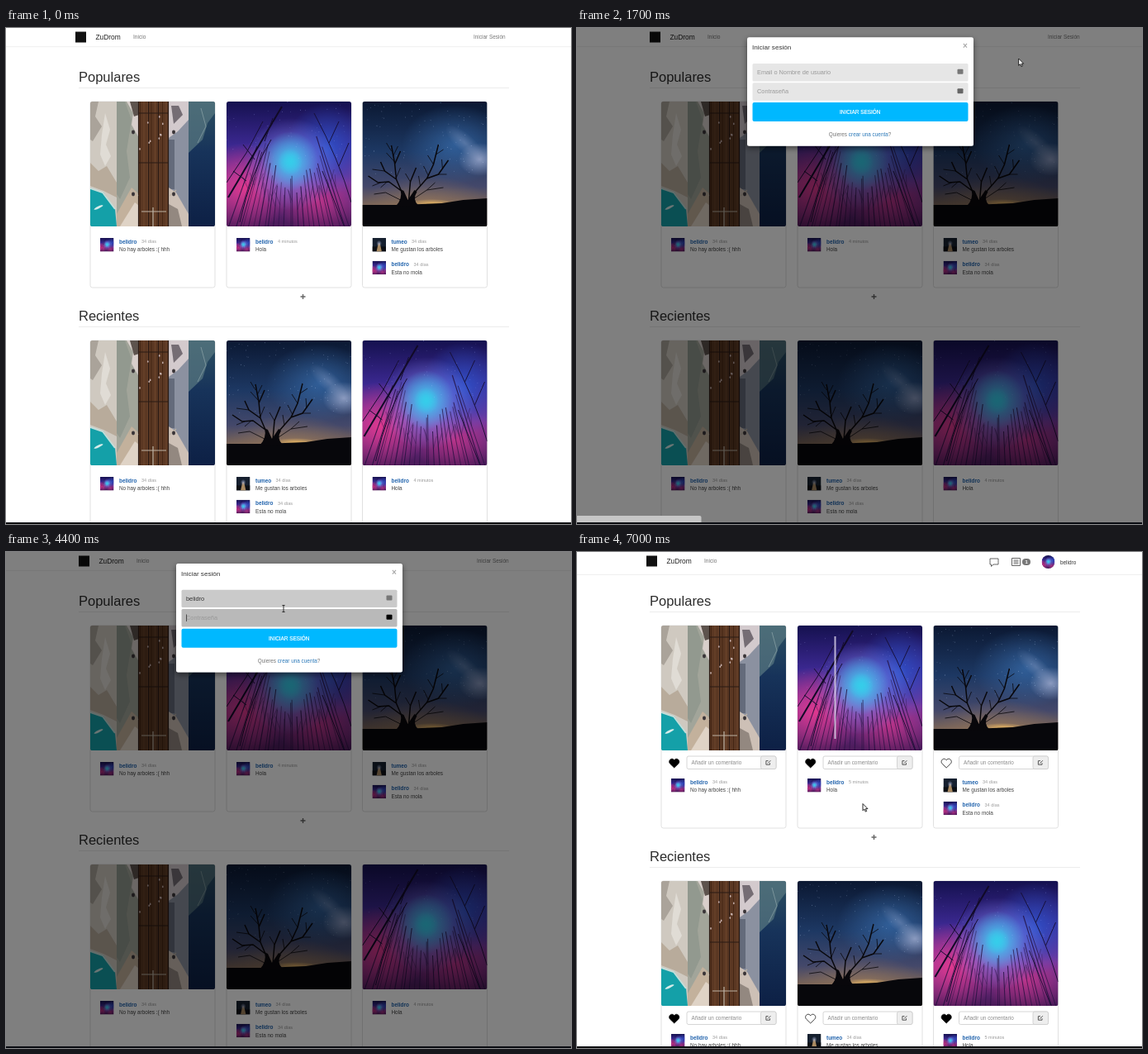
These frames come from a looping animation (684 by 600 pixels, 7.1 s). An HTML page:

```html
<!DOCTYPE html>
<html lang="es">
<head>
<meta charset="utf-8">
<title>ZuDrom</title>
<style>
  html, body { margin: 0; width: 100%; height: 100%; overflow: hidden; background: #fff; }
  svg { display: block; }
  text { font-family: "Liberation Sans", Arial, sans-serif; white-space: pre; }
</style>
</head>
<body>
<svg id="stage" width="684" height="600" viewBox="0 0 684 600"></svg>
<script>
const LOOP = 7100, STEP = 100;
const USER = 'belidro', FRIEND = 'tumeo';
const $ = id => document.getElementById(id);
const clamp = v => Math.max(0, Math.min(1, v));

// Markup helpers
const rect = (x, y, w, h, fill, more = '') =>
  `<rect x="${x}" y="${y}" width="${w}" height="${h}" fill="${fill}" ${more}/>`;
const path = (d, fill, more = '') => `<path d="${d}" fill="${fill}" ${more}/>`;
const line = (d, color, w, more = '') =>
  path(d, 'none', `stroke="${color}" stroke-width="${w}" ${more}`);
const oval = (x, y, rx, ry, fill, more = '') =>
  `<ellipse cx="${x}" cy="${y}" rx="${rx}" ry="${ry}" fill="${fill}" ${more}/>`;
const label = (x, y, size, fill, str, more = '') =>
  `<text x="${x}" y="${y}" font-size="${size}" fill="${fill}" ${more}>${str}</text>`;
const use = (id, x, y, size) =>
  `<use href="#${id}" x="${x}" y="${y}" width="${size}" height="${size}"/>`;
const stops = list => list.map(([o, c, a = 1]) =>
  `<stop offset="${o}" stop-color="${c}" stop-opacity="${a}"/>`).join('');
const linear = (id, list) =>
  `<linearGradient id="${id}" x2="0" y2="1">${stops(list)}</linearGradient>`;
const radial = (id, color, a = 1) =>
  `<radialGradient id="${id}">${stops([[0, color, a], [1, color, 0]])}</radialGradient>`;
const photo = (id, body) =>
  `<symbol id="${id}" viewBox="0 0 151 151"><g clip-path="url(#round)">${body}</g></symbol>`;

let seed = 7;
const rnd = () => (seed = seed * 16807 % 2147483647) / 2147483647;
const many = (n, fn) => Array.from({ length: n }, (_, i) => fn(i)).join('');
const stars = (n, h, color) => many(n, () =>
  oval((rnd() * 151).toFixed(1), (rnd() * h).toFixed(1), .45, .45, color, `opacity="${(.2 + rnd() * .5).toFixed(2)}"`));

function pier() {
  return rect(0, 0, 151, 151, '#cfc9c0') +
    path('M0 0H10L6 18 14 30 3 48 0 46Z', '#aaa39a') +
    path('M18 14L24 34 19 52 25 66 18 78 12 64 14 40Z', '#e0dcd5') +
    path('M0 74L10 84 20 78 32 98V116L16 108 0 102Z', '#b8ab9b') +
    path('M0 105L16 110 30 130 32 151H0Z', '#14a0a8') +
    line('M0 105L15 110 30 130', '#c3deda', 2) +
    oval(10, 128, 6, 1.3, '#d6ecea', 'transform="rotate(-25 10 128)"') +
    rect(32, 0, 27, 151, '#a2a59a') +
    path('M32 0H42L50 22 44 60 48 92 36 118 32 112Z', '#92998f') +
    path('M44 0H59V44L50 28 52 14Z', '#d8cfcb') +
    path('M48 0H59V16L53 18Z', '#5d534d') +
    path('M32 136L50 104 59 112V151H32Z', '#c3b19c') +
    path('M36 151L54 122 59 126V151Z', '#dfd3c6') +
    rect(95, 0, 24, 151, '#8b91a0') +
    path('M95 0H119V22L106 36 95 44Z', '#d3cacd') +
    path('M98 5H107L112 16 101 27Z', '#756d74') +
    rect(95, 46, 7, 60, '#646b7b') +
    path('M95 104L104 110 119 136V151H95Z', '#cdc0b6') +
    path('M95 124L106 130 111 151H95Z', '#938880') +
    rect(119, 0, 32, 151, 'url(#sea)') +
    path('M119 0H151V14L142 26 136 46 119 62Z', '#5b7a82', 'opacity=".7"') +
    line('M134 8L140 30 130 50', '#a9bdbd', 1, 'opacity=".5"') +
    rect(58, 0, 37, 151, '#5b3823') +
    many(8, i => rect(60 + i * 4.5, 0, 1, 151, i % 3 ? '#6d452c' : '#442615')) +
    line('M58.5 0V151M70.5 0V151M82.5 0V151M94.5 0V151M58 14H95M58 74H95', '#2a1a14', 1.2) +
    line('M62 133H92M76 128V151M50 107L58 114M96 114L104 107', '#bdb2a4', 1.2) +
    many(9, () => oval((60 + rnd() * 34).toFixed(1), (16 + rnd() * 45).toFixed(1), .8, 1.3, '#c9b3b0')) +
    many(4, i => oval(i % 2 ? 101 : 52, i < 2 ? 37 : 112, 2, 2.4, '#3a3538'));
}

function forest() {
  // Trunks lean to the middle; the outer ones reach higher
  const trunk = i => {
    const x = 2 + i * 6 + rnd() * 4, top = 92 - Math.abs(x - 77) * .8 + rnd() * 28;
    const tx = x + (77 - x) * (151 - top) / 210;
    return line(`M${x.toFixed(1)} 152L${tx.toFixed(1)} ${top.toFixed(1)}`,
      '#24103f', (.5 + rnd() * .7).toFixed(2), 'opacity=".8"') +
      line(`M${((x + tx) / 2).toFixed(1)} ${((152 + top) / 2).toFixed(1)}l${(rnd() * 14 - 7).toFixed(1)} -15`, '#2c1548', .4);
  };
  return rect(0, 0, 151, 151, 'url(#dusk)') +
    oval(22, 104, 58, 54, 'url(#pink)') + oval(112, 120, 52, 40, 'url(#pink)', 'opacity=".7"') +
    oval(122, 58, 52, 56, 'url(#blue)') + oval(78, 76, 58, 56, 'url(#lilac)') +
    oval(77, 72, 34, 36, 'url(#cyan)') + oval(77, 73, 15, 16, 'url(#cyan)') +
    stars(60, 75, '#a9b4ff') + many(25, trunk) +
    line('M2 116Q28 72 67 6', '#110a26', 2) +
    line('M0 98L24 62 44 24M16 146Q30 84 54 46M34 70L20 52M46 48L56 20M24 96L8 84', '#160d30', 1) +
    line('M151 122Q136 70 106 14M136 78L148 50M124 50L136 24M142 150L116 84', '#160d30', .9);
}

function tree() {
  return rect(0, 0, 151, 151, 'url(#night)') +
    oval(112, 52, 64, 48, 'url(#sky)') + oval(142, 70, 26, 20, 'url(#milk)') +
    oval(124, 50, 30, 11, 'url(#milk)', 'transform="rotate(42 124 50)" opacity=".45"') +
    oval(78, 126, 78, 36, 'url(#glow)') + oval(84, 123, 30, 5, 'url(#warm)') +
    stars(90, 95, '#bcd2f4') +
    path('M0 125L46 125 96 123 122 119 151 117V151H0Z', '#07070b') +
    path('M40 127Q49 118 46 106L50 108 55 119 63 107 66 109Q60 119 68 126Z', '#08070b') +
    line('M47 108L41 94 39 74 35 53M47 108L32 97 19 98 7 90M41 94L27 84 22 73M39 76L46 60' +
      'M64 109L78 93 86 76 92 52M78 93L92 88 104 71M56 120L58 97 65 80', '#08070b', 1.5) +
    line('M30 97L22 104M27 84L12 82M39 73L29 62M58 97L52 87M86 76L79 65M92 88L102 88' +
      'M60 119L78 107 98 104M78 107L88 98M89 64L98 58M35 60L29 50M46 119L28 110 14 112' +
      'M22 98L12 102M41 92L46 80M37 66L43 54M80 90L74 78M97 82L96 70M70 102L68 90', '#08070b', .8);
}

const road = rect(0, 0, 151, 151, '#16202f') + rect(0, 95, 151, 56, '#0c0f14') +
  path('M66 60H84L104 151H46Z', '#a98a62') + oval(75, 60, 30, 34, 'url(#milk)');

const defs = `<defs>
  <clipPath id="round"><rect width="151" height="151" rx="2.6"/></clipPath>
  <clipPath id="face"><circle cx="570.5" cy="12" r="8"/></clipPath>
  <filter id="shadow" x="-10%" y="-10%" width="120%" height="130%">
    <feDropShadow dx="0" dy="2.5" stdDeviation="3.5" flood-opacity=".5"/></filter>` +
  linear('sea', [[0, '#2c5061'], [.4, '#17335a'], [1, '#0d2045']]) +
  linear('dusk', [[0, '#15114f'], [.35, '#3b2890'], [.65, '#77369a'], [1, '#4a1a58']]) +
  linear('night', [[0, '#0b1832'], [.4, '#1d3863'], [.68, '#44486a'], [.84, '#7d6656']]) +
  radial('pink', '#e4388e', .95) + radial('blue', '#2c55cf', .85) + radial('lilac', '#7d86ee', .95) +
  radial('cyan', '#35cdea', .95) + radial('sky', '#3a70b0', .7) + radial('milk', '#a9b4d6', .75) +
  radial('glow', '#9c7b5c', .7) + radial('warm', '#e8b765', .9) +
  photo('pier', pier()) + photo('forest', forest()) + photo('tree', tree()) + photo('road', road) +
  '</defs>';

function comment(x, y, who, when, str) {
  return use(who === USER ? 'forest' : 'road', x + 12, y, 16.5) +
    label(x + 35, y + 6.6, 6.4, '#1f62ac', who, 'font-weight="bold"') +
    label(x + (who === USER ? 62 : 59.5), y + 6.4, 5.5, '#999', when) +
    label(x + 35, y + 16, 6.4, '#444', str);
}

function card(x, y, kind, member) {
  const h = member ? 245 : 225;
  const notes = {
    pier: [[USER, '34 días', 'No hay arboles :( hhh']],
    forest: [[USER, (member ? 5 : 4) + ' minutos', 'Hola']],
    tree: [[FRIEND, '34 días', 'Me gustan los arboles'], [USER, '34 días', 'Esta no mola']]
  }[kind];
  let out = rect(x, y, 151, h, '#fff', 'rx="2.6" stroke="#dedede" stroke-width=".9"') + use(kind, x, y, 151);
  if (member) {
    const heart = `M${x + 15.7} ${y + 172}l-5-4.8c-3.4-3.6 2-8.6 5-4.4c3-4.2 8.4.8 5 4.4z`;
    out += path(heart, kind === 'tree' ? '#fff' : '#000', 'stroke="#111" stroke-width=".8"') +
      rect(x + 31, y + 158, 108, 15.5, '#fff', 'rx="2" stroke="#ccc" stroke-width=".8"') +
      rect(x + 120.5, y + 158, 18.5, 15.5, '#eee', 'rx="2" stroke="#ccc" stroke-width=".8"') +
      label(x + 36.5, y + 168, 6.4, '#8c8c8c', 'Añadir un comentario') +
      line(`M${x + 129.5} ${y + 163.6}h-2.6v4.6h4.6v-2M${x + 129} ${y + 166.6}l3.4-3.4`, '#444', .9);
  }
  notes.forEach((n, i) => out += comment(x, y + (member ? 185 : 165) + i * 27.7, ...n));
  return out;
}

function page(member) {
  const low = member ? 20 : 0, cols = [102, 267, 431.5];
  const row = (y, kinds) => kinds.map((k, i) => card(cols[i], y, k, member)).join('');
  const title = (y, str) => label(88, y, 16.5, '#2c2c2c', str) + rect(88, y + 7.2, 521, .8, '#e8e8e8');
  const navY = member ? 27 : 22.3;
  const right = member
    ? line('M500 8h10v7h-6l-2.5 2.5V15h-1.5zM526.5 7.5h10v9h-10zM528.5 10h6M528.5 12h6M528.5 14h6', '#555', .9) +
      rect(539, 8, 10, 8, '#777', 'rx="4"') + label(542.4, 14.2, 5.8, '#fff', 1, 'font-weight="bold"') +
      `<g clip-path="url(#face)">${use('forest', 562.5, 4, 16)}</g>` + label(585, 15, 6.4, '#333', USER)
    : label(566, 13.2, 6.45, '#777', 'Iniciar Sesión');
  return rect(0, 0, 684, 600, '#fff') + rect(0, navY, 684, .8, '#ebebeb') +
    `<g ${member ? '' : 'id="nav"'}>` + rect(84, 4.5, 13, 13, '#111') +
    label(108.5, 13.8, 8.4, '#222', 'ZuDrom') + label(154, 13.2, 6.6, '#777', 'Inicio') + right + '</g>' +
    title(65, 'Populares') + row(89, ['pier', 'forest', 'tree']) +
    line(`M356.5 ${325 + low}h6M359.5 ${322 + low}v6`, '#666', 1.4) +
    title(354 + low, 'Recientes') + row(378 + low, ['pier', 'tree', 'forest']);
}

const field = (id, y) => rect(212.5, y, 261, 21.4, '#e6e6e6', `id="${id}Box" rx="1.5"`) +
  label(218, y + 13, 7.35, '#999', '', `id="${id}Text"`) +
  rect(218, y + 6.5, .7, 8.5, '#222', `id="${id}Caret"`) +
  rect(460.5, y + 6.8, 7, 6, '#777', `id="${id}Icon" rx="1"`);

const modal = rect(206, 14, 274, 131.5, '#fff', 'rx="2.5" filter="url(#shadow)"') +
  label(212, 28.8, 8.1, '#333', 'Iniciar sesión') + label(467, 28, 10, '#aaa', '×', 'font-weight="bold"') +
  field('user', 45.7) + field('pass', 69) +
  rect(212.5, 92.7, 261, 23, '#00b8ff', 'id="button" rx="2"') +
  label(342.7, 106.5, 6.4, '#fff', 'INICIAR SESIÓN', 'text-anchor="middle" stroke="#fff" stroke-width=".2"') +
  label(304.7, 134, 6.4, '#777', 'Quieres <tspan fill="#2a78b8">crear una cuenta</tspan>?');

const alertBox = rect(-132, -76, 264, 152, '#fff', 'rx="2.5"') +
  oval(0, -31, 22, 22, 'none', 'id="ring" stroke-width="2.2"') +
  line('M-11 -31L-3 -23 11 -38', '#a5dc86', 2.8, 'id="tick" stroke-dasharray="32"') +
  label(0, 23.5, 16.5, '#575757', 'Logged', 'text-anchor="middle" font-weight="bold"');

$('stage').innerHTML = defs +
  `<g id="guest">${page(false)}${rect(0, 0, 684, 600, '#000', 'id="shade"')}<g id="modal">${modal}</g>
    ${rect(0, 0, 684, 600, '#000', 'id="veil"')}<g id="alert">${alertBox}</g></g>
  <g id="member">${page(true)}${rect(311.5, 102, 2, 124, '#dcd5ea', 'opacity=".8"')}</g>` +
  rect(-3, 590, 153.5, 10, '#c6c6c6', 'id="status" rx="2"') + rect(0, 598, 684, 2, '#0b0d12') +
  `<g id="cursor">` +
  path('M0 0V8.3L1.9 6.6 3.3 9.6 4.7 9 3.4 6.1H6Z', '#fff', 'id="arrow" stroke="#111" stroke-width=".9"') +
  line('M-1.6 -4H1.6M0 -4V4M-1.6 4H1.6', '#222', .9, 'id="beam"') + '</g>';

// time, x, y
const trail = [[100, 676, 400], [500, 668, 228], [800, 628, 110], [1100, 586, 22], [1300, 582, 13.5],
  [1600, 582, 13.5], [1900, 440, 84], [2000, 432, 85], [2300, 350, 60], [2500, 336, 60], [2600, 336, 68.5],
  [5500, 336, 68.5], [5800, 328.5, 102.5], [6300, 328.5, 102.5], [6800, 346, 304.5]];
const popScale = [[6300, .7], [6400, 1.02], [6500, 1.04], [6600, .96], [6700, 1]];

function at(keys, t) {
  const i = keys.findIndex(k => k[0] > t);
  if (i === 0) return keys[0].slice(1);
  if (i < 0) return keys[keys.length - 1].slice(1);
  const a = keys[i - 1], b = keys[i], p = (t - a[0]) / (b[0] - a[0]);
  return a.slice(1).map((v, n) => v + (b[n + 1] - v) * p);
}
const set = (id, attrs) => { for (const k in attrs) $(id).setAttribute(k, attrs[k]); };
const show = (id, on) => set(id, { visibility: on ? 'inherit' : 'hidden' });

function drawField(id, value, hint, hover, focusAt, blurAt, t) {
  const focus = t >= focusAt && t < blurAt;
  set(id + 'Box', { fill: focus ? '#b9b9b9' : hover ? '#cacaca' : '#e6e6e6' });
  const text = $(id + 'Text');
  text.textContent = value || hint;
  text.setAttribute('fill', value ? '#333' : '#999');
  show(id + 'Caret', focus && (value || Math.floor((t - focusAt) / 500) % 2 === 0));
  set(id + 'Caret', { x: 218.3 + (value ? text.getComputedTextLength() : 0) });
  if (id === 'pass') set('passIcon', { fill: hover || focus ? '#000' : '#666' });
}

function draw(t) {
  const [x, y] = at(trail, t), logged = t >= 6800;
  show('guest', !logged);
  show('member', logged);

  const open = clamp((t - 1500) / 300);
  set('nav', { transform: `translate(${t >= 1600 ? 4 : 0} 0)` });
  set('shade', { opacity: .5 * clamp((t - 1500) / 200) });
  set('modal', { opacity: clamp((t - 1500) / 200), transform: `translate(0 ${-24 * (1 - open) ** 2})` });

  const inside = open === 1 && !logged && x > 212 && x < 473;
  const onUser = inside && y > 46 && y < 69, onPass = inside && y >= 69 && y < 91;
  const typed = from => Math.max(0, Math.min(USER.length, (t - from) / STEP));
  drawField('user', USER.slice(0, typed(3200)), 'Email o Nombre de usuario', onUser, 2500, 4100, t);
  drawField('pass', '•'.repeat(typed(4800)), 'Contraseña', onPass, 4100, 5900, t);
  set('button', { fill: inside && y >= 92 && y < 116 ? '#00a6e8' : '#00b8ff' });

  show('alert', t >= 6300 && !logged);
  set('alert', { transform: `translate(338.8 296) scale(${at(popScale, t)[0]})` });
  set('veil', { opacity: t < 6300 ? 0 : t < 6400 ? .14 : .4 });
  set('ring', { stroke: t < 6400 ? '#efefef' : '#dff1d5' });
  set('tick', { 'stroke-dashoffset': 32 * (1 - clamp((t - 6400) / 300)) });
  show('tick', t > 6400 && !logged);

  set('status', { opacity: t < 1400 || t > 2200 ? 0 : t < 1600 ? .25 : t < 2100 ? 1 : .5 });
  show('cursor', t >= 100);
  set('cursor', { transform: `translate(${x} ${y})` });
  show('beam', onUser || onPass);
  show('arrow', t >= 100 && !(onUser || onPass));
}

let last = -1;
const start = performance.now();
function tick() {
  const t = Math.floor((performance.now() - start) % LOOP / STEP) * STEP;
  if (t !== last) draw(last = t);
  requestAnimationFrame(tick);
}
tick();
</script>
</body>
</html>
```
